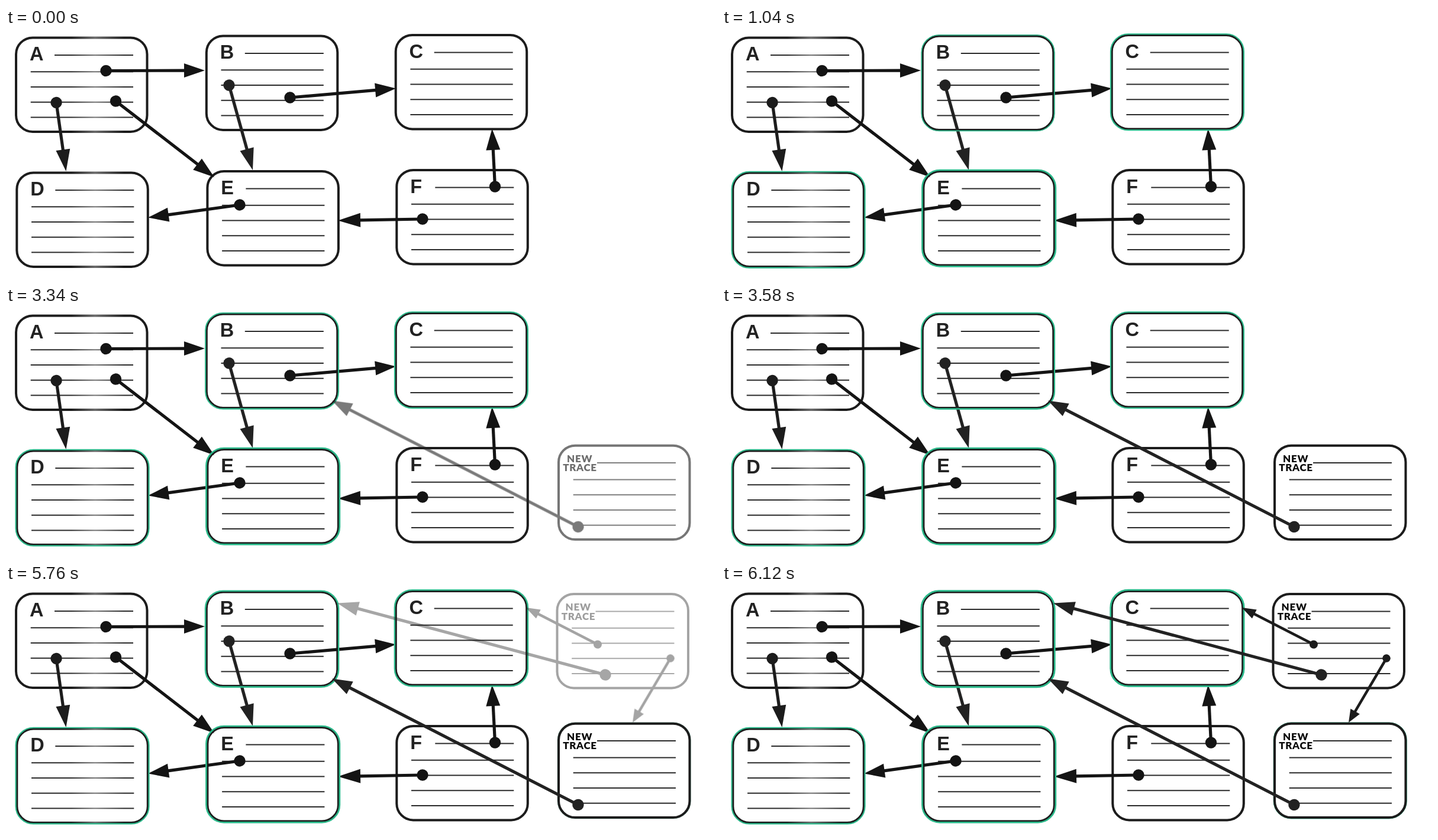
These frames come from a looping animation (1200 px wide and 424 px high, 8 s). An HTML page:

```html
<!DOCTYPE html>
<html lang="en">
<head>
<meta charset="utf-8">
<title>Linked cards</title>
<style>
  html, body { margin: 0; height: 100%; overflow: hidden; background: #fff; }
  svg { display: block; width: 100vw; height: 100vh; }
  .card, .rule, .glow { fill: none; }
  .card { stroke: #1c1c1c; stroke-width: 4; }
  .rule { stroke: #2a2a2a; stroke-width: 2; }
  .glow { stroke: #2ab98a; }
  .letter { font: bold 32.5px "Liberation Sans", Arial, sans-serif; fill: #222; }
  .label { font: 900 17px Lato, Inter, sans-serif; letter-spacing: .7px; text-anchor: middle; fill: #0c0c0c; }
</style>
</head>
<body>
<svg viewBox="0 0 1200 424">
  <defs>
    <linearGradient id="fade">
      <stop offset="0" stop-color="#fff" stop-opacity="0"/>
      <stop offset=".45" stop-color="#fff" stop-opacity=".35"/>
      <stop offset="1" stop-color="#fff" stop-opacity="0"/>
    </linearGradient>
  </defs>
</svg>
<script>
const svg = document.querySelector('svg');
const W = 221.5, H = 159.4, LOOP = 8000;
const STARTS = [500, 3040, 5580], STEP = 60, STEPS = 10;

const cards = {
  A: [17, 16.5], B: [338.8, 13.5], C: [658.7, 12],
  D: [18.3, 245.5], E: [340.4, 243], F: [660.3, 241],
  G: [934, 236.7], H: [931.5, 17]
};

function add(parent, tag, attrs, text) {
  const el = document.createElementNS('http://www.w3.org/2000/svg', tag);
  for (const key in attrs) el.setAttribute(key, attrs[key]);
  if (text) el.textContent = text;
  return parent.appendChild(el);
}

function card(parent, name, isNew) {
  const [x, y] = cards[name];
  add(parent, 'rect', { class: 'card', x, y, width: W, height: H, rx: 28 });
  let d = `M${x + 65} ${y + 29.4}H${x + 198}`;
  for (let i = 0; i < 4; i++) d += `M${x + 24.7} ${y + 57.7 + 25.8 * i}H${x + 198}`;
  add(parent, 'path', { class: 'rule', d });
  if (isNew) {
    add(parent, 'text', { class: 'label', x: x + 35.7, y: y + 28.3 }, 'NEW');
    add(parent, 'text', { class: 'label', x: x + 36, y: y + 43.7 }, 'TRACE');
  } else {
    add(parent, 'text', { class: 'letter', x: x + 22.9, y: y + 38.6 }, name);
  }
}

// Dot at the start, line, and a solid triangular head whose tip is at the end
function arrow(parent, x1, y1, x2, y2, { color = '#141414', r = 9.7, line = 5.2, head = 35, half = 12 } = {}) {
  const len = Math.hypot(x2 - x1, y2 - y1);
  const angle = Math.atan2(y2 - y1, x2 - x1) * 180 / Math.PI;
  const g = add(parent, 'g', { transform: `translate(${x1} ${y1}) rotate(${angle})`, fill: color });
  add(g, 'circle', { r });
  add(g, 'path', { d: `M0 0H${len - head + 1}`, stroke: color, 'stroke-width': line });
  add(g, 'path', { d: `M${len} 0L${len - head} ${-half}V${half}Z` });
}

function glow(parent, name, level) {
  const [x, y] = cards[name], w = 1.1 + .5 * level, out = .7 + w / 2;
  add(parent, 'rect', {
    class: 'glow', x: x - out, y: y - out, rx: 28 + out, 'stroke-width': w,
    width: W + 2 * out, height: H + 2 * out
  });
}

const base = add(svg, 'g');
for (const name of 'ABCDEF') card(base, name);
add(base, 'rect', { x: 110, y: 0, width: 90, height: 424, fill: 'url(#fade)' });
arrow(base, 169, 72.5, 336, 72);
arrow(base, 85, 126.5, 101.5, 243, { color: '#1c1c1c', head: 37 });
arrow(base, 185.5, 124, 352, 253, { head: 36 });
arrow(base, 480, 118, 659, 102.5);
arrow(base, 377, 97, 417, 241, { color: '#222', head: 37 });
arrow(base, 395, 300, 240, 321.5);
arrow(base, 704, 324, 561, 326.5, { head: 38 });
arrow(base, 826.5, 269, 821.5, 171, { head: 36 });

// Each card glows more strongly the more links lead to it
const glows = ['B1 C2 D2 E3', 'B2', 'B3 C3 G1'].map(list => {
  const g = add(svg, 'g');
  for (const [name, level] of list.split(' ')) glow(g, name, +level);
  return g;
});

const lower = add(svg, 'g');
card(lower, 'G', true);
arrow(lower, 967, 374.5, 551, 160.5, { color: '#222', head: 34 });

const upper = add(svg, 'g');
card(upper, 'H', true);
arrow(upper, 1013, 154, 560, 32.5, { color: '#222', head: 36 });
arrow(upper, 1000, 102.5, 878.5, 40, { color: '#1c1c1c', r: 7, line: 4.5, head: 24, half: 8.5 });
arrow(upper, 1123, 126, 1059, 235, { color: '#1c1c1c', r: 6.7, line: 4.5, head: 22, half: 9 });

const phases = [[glows[0]], [glows[1], lower], [glows[2], upper]];
const origin = performance.now();

function draw(now) {
  const t = Math.max(0, now - origin) % LOOP;
  phases.forEach((layers, i) => {
    const n = Math.floor((t - STARTS[i]) / STEP) + 1;
    const opacity = Math.min(1, Math.max(0, n / STEPS));
    for (const layer of layers) layer.setAttribute('opacity', opacity);
  });
  requestAnimationFrame(draw);
}
draw(origin);
</script>
</body>
</html>
```
